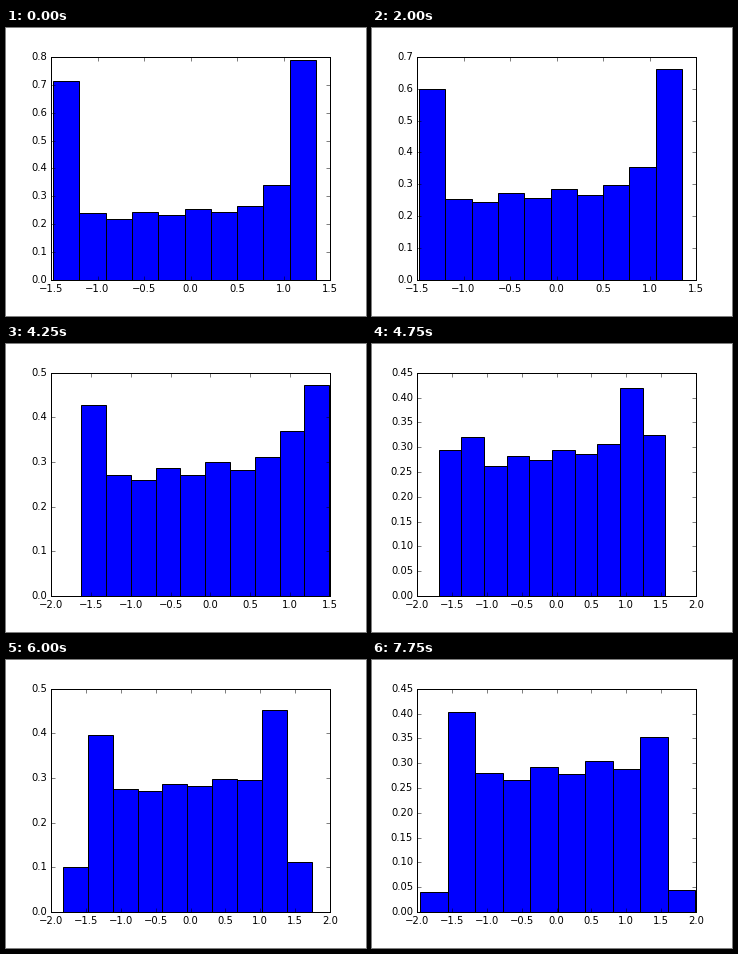
Write a matplotlib script that moves like this. It is 360x288 px and loops after 8 s.

```python
import numpy as np
import matplotlib.pyplot as plt
from matplotlib.animation import FuncAnimation

plt.style.use("classic")
plt.rcParams.update({
    "figure.facecolor": "white",
    "savefig.dpi": "figure",
    "font.family": "DejaVu Sans",
    "font.size": 10,
    "xtick.labelsize": 10,
    "ytick.labelsize": 10,
})

STEPS = 32
INTERVAL = 250
BINS = 10
HOLD = 4      # steps before the shape starts to change
SPREAD = 13   # step at which the range starts to widen

fig = plt.figure(figsize=(5, 4), dpi=72)
fig.subplots_adjust(left=.125, right=.9, bottom=.125, top=.9)
ax = fig.add_subplot()
bars = ax.bar(range(BINS), np.ones(BINS), width=1, align="edge",
              facecolor="#0000ff", edgecolor="black", linewidth=1)


def data_range(step):
    """Fixed at first, then widening: quickly on the left, evenly on the right."""
    grown = max(step - SPREAD, 0) / (STEPS - 1 - SPREAD)
    low = -1.478 - .472 * (1 - (1 - grown) ** 1.45)
    high = 1.35 + .635 * grown
    return low, high


def bar_heights(step):
    """Two tall ends sink while the shoulders beside a rippling floor rise."""
    t = step if step >= HOLD else 0
    i = np.arange(BINS)

    floor = .243 + .042 * min(t / 12, 1)
    ripple = .012 * np.cos(.668 * (t - 27))
    heights = floor + .006 * (i - 4.5) - ripple * (-1.0) ** i

    end = np.interp(t, [0, 8, 12, 17, 21, 27], [.75, .63, .60, .45, .17, .043])
    shoulder = np.interp(t, [0, 17, 21, 27, 31], [.29, .32, .42, .43, .378])
    lean = np.interp(t, [21, 31], [.05, -.025])
    heights[[0, -1]] = end * .95, end * 1.05
    heights[[1, -2]] = shoulder - lean, shoulder + lean
    return heights


def round_axes(low, high, peak):
    """Fit both axes to whole tick steps around the data."""
    left, right = np.floor(low / .5), np.ceil(high / .5)
    gap = .05 if peak <= .45 else .1
    count = int(np.ceil(peak / gap - 1e-9))
    ax.set_xticks(np.arange(left, right + 1) * .5)
    ax.set_yticks(np.arange(count + 1) * gap)
    ax.set_xlim(left * .5, right * .5)
    ax.set_ylim(0, count * gap)


def draw(step):
    low, high = data_range(step)
    heights = bar_heights(step)
    edges = np.linspace(low, high, BINS + 1)
    for bar, x, height in zip(bars, edges, heights):
        bar.set_bounds(x, 0, edges[1] - edges[0], height)
    round_axes(low, high, heights.max())
    return list(bars)


anim = FuncAnimation(fig, draw, frames=STEPS, interval=INTERVAL,
                     init_func=lambda: draw(0), repeat=True, repeat_delay=0)
plt.show()
```
